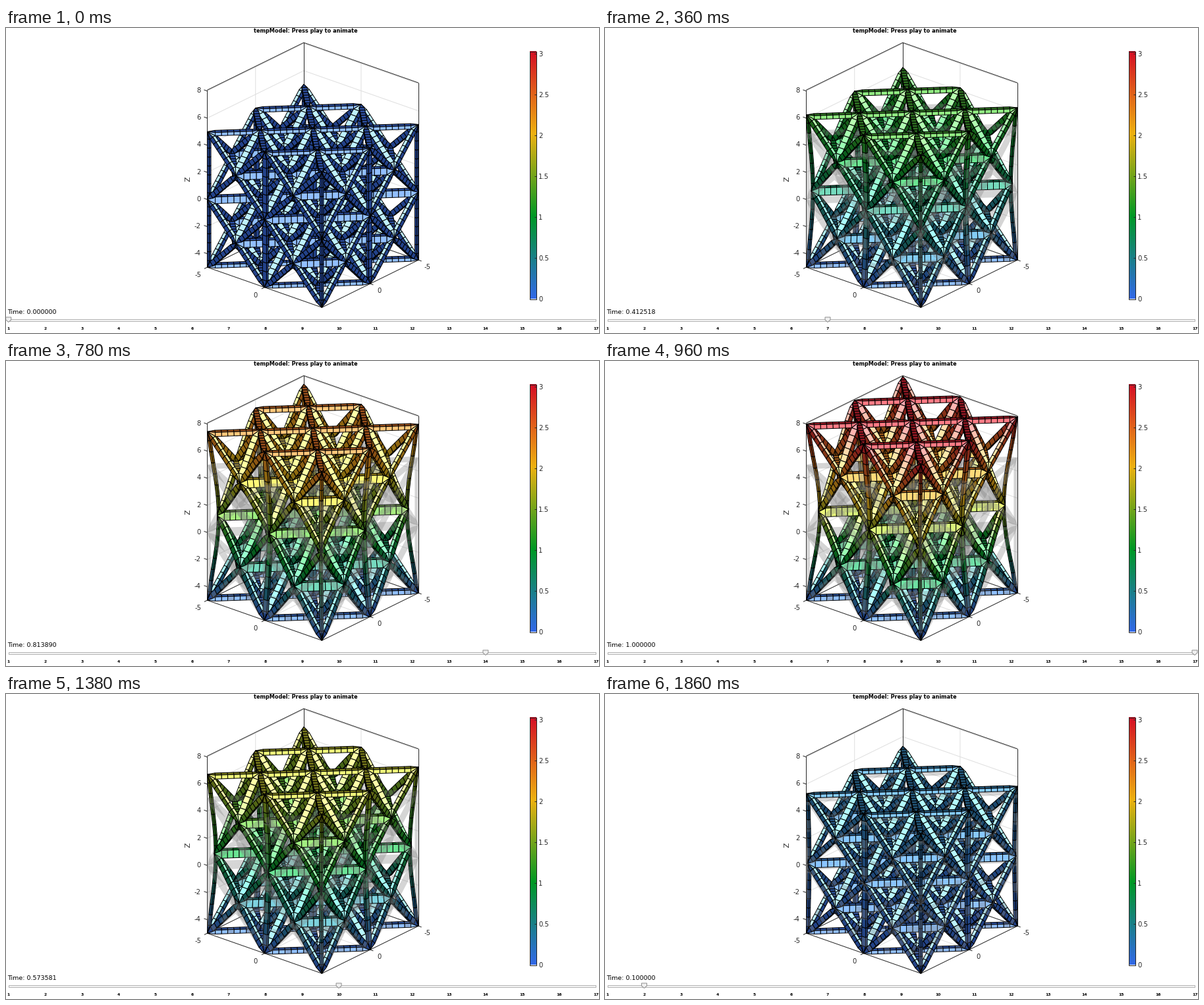
Recreate the animation shown at these times as a matplotlib script. Size 900 by 463 pixels, loop 1.92 s.

```python
import itertools
import numpy as np
import matplotlib.pyplot as plt
from matplotlib.animation import FuncAnimation
from matplotlib.collections import PolyCollection
from matplotlib.colors import LinearSegmentedColormap

W, H, DPI = 900, 463, 100
STEPS, FRAMES, INTERVAL = 17, 32, 60
PX = 72 / DPI
ZMAX = 8.07
CMAX = 3.03
INSET = 0.3  # distance from a strut axis to the rim of its triangular windows

# Orthographic view: screen = ORIGIN + points @ PROJ, y pointing down
ORIGIN = np.array([465.7, 254.8])
PROJ = np.array([[-14.65, 7.2], [17.4, 6.1], [0, -20.58]])
VIEW = np.cross(PROJ[:, 0], -PROJ[:, 1])
VIEW = VIEW / np.linalg.norm(VIEW)
LIGHT = np.array([0.56, 0.56, 0.61])

STOPS = np.array([[51, 105, 232], [0, 153, 37], [238, 178, 17], [213, 15, 37]]) / 255
CMAP = LinearSegmentedColormap.from_list("spectrum", STOPS)


def project(p):
    return ORIGIN + np.asarray(p, float) @ PROJ


def octet_struts():
    """Node pairs of a 2x2x2 octet truss with extra vertical members."""
    grid = range(-2, 3)
    nodes = [n for n in itertools.product(grid, repeat=3) if sum(n) % 2 == 0]
    steps = [(1, 1, 0), (1, -1, 0), (1, 0, 1), (1, 0, -1), (0, 1, 1), (0, 1, -1)]
    pairs = []
    for n in nodes:
        for s in steps:
            m = tuple(np.add(n, s))
            if max(map(abs, m)) <= 2:
                pairs.append((n, m))
    for x, y, z in itertools.product((-2, 0, 2), (-2, 0, 2), (-2, 0)):
        pairs.append(((x, y, z), (x, y, z + 2)))
    return 2.5 * np.array(pairs, float)


def build_mesh(segments):
    """Quads (n, 4, 3) and normals (n, 3) of struts that taper to their nodes."""
    quads, normals = [], []
    for a, b in octet_struts():
        length = np.linalg.norm(b - a)
        d = (b - a) / length
        u = np.eye(3)[np.argmin(np.abs(d))]
        w = np.cross(d, u)
        thin = INSET / np.sqrt(3)
        tall = thin if abs(d[2]) > 0.9 else thin * np.sqrt(2)
        ring = np.array([tall * i * u + thin * j * w
                         for i, j in ((1, 1), (-1, 1), (-1, -1), (1, -1))])
        tip = INSET * np.sqrt(3) / length
        s = np.r_[0, np.linspace(tip, 1 - tip, segments + 1), 1][:, None, None]
        taper = np.minimum(1, np.minimum(s, 1 - s) / tip)
        pts = np.clip(a + s * (b - a) + taper * ring, -5, 5)
        for k, normal in enumerate((w, -u, -w, u)):
            m = (k + 1) % 4
            quads.append(np.stack([pts[:-1, k], pts[:-1, m],
                                   pts[1:, m], pts[1:, k]], axis=1))
            normals.append(np.tile(normal, (segments + 2, 1)))
    return np.concatenate(quads), np.concatenate(normals)


def displacement(p, t):
    """Stretch along z with necking between the clamped ends."""
    neck = 0.115 * t * np.maximum(np.cos(np.pi * p[..., 2] / 10), 0) ** 1.5
    return np.stack([-p[..., 0] * neck, -p[..., 1] * neck,
                     0.3 * t * (p[..., 2] + 5)], axis=-1)


def front_facing(scr):
    x, y = scr[..., 0], scr[..., 1]
    area = np.sum(x * np.roll(y, -1, 1) - y * np.roll(x, -1, 1), axis=1) / 2
    return area < -0.3


QUADS, NORMALS = build_mesh(6)
lit = np.maximum(NORMALS @ LIGHT, 0)[:, None]
DIFFUSE = 0.42 + 0.85 * lit ** 3
GLOSS = 2.6 * lit ** 8

ghost_quads, _ = build_mesh(2)
ghost_scr = project(ghost_quads)
seen = front_facing(ghost_scr)
GHOST = ghost_scr[seen]
GHOST_DEPTH = ghost_quads[seen].mean(axis=1) @ VIEW
GHOST_RGBA = np.tile([0.5, 0.5, 0.5, 0.33], (len(GHOST), 1))


def scene(t):
    """Depth-sorted polygons with face and edge colours at load t."""
    u = displacement(QUADS, t)
    pts = QUADS + u
    scr = project(pts)
    keep = front_facing(scr)
    value = np.linalg.norm(u[keep].mean(axis=1), axis=1)
    rgb = CMAP(value / CMAX)[:, :3] * DIFFUSE[keep] + GLOSS[keep]
    face = np.column_stack([np.clip(rgb, 0, 1), np.ones(len(rgb))])
    edge = np.tile([0, 0, 0, 1.0], (len(rgb), 1))
    polys, depth = scr[keep], pts[keep].mean(axis=1) @ VIEW
    if t > 0:
        polys = np.concatenate([polys, GHOST])
        depth = np.concatenate([depth, GHOST_DEPTH])
        face = np.concatenate([face, GHOST_RGBA])
        edge = np.concatenate([edge, np.zeros_like(GHOST_RGBA)])
    order = np.argsort(depth)
    return polys[order], face[order], edge[order]


def load_time(i):
    return float(np.interp(i, [1, 2, 5, 7, 10, 14, 17],
                           [0, 0.1, 0.337259, 0.412518, 0.573581, 0.81389, 1]))


fig = plt.figure(figsize=(W / DPI, H / DPI), dpi=DPI, facecolor="white")
ax = fig.add_axes([0, 0, 1, 1])
ax.axis("off")


def line(pts, color="#262626", width=1, z=1):
    x, y = np.transpose(pts)
    ax.plot(x, y, color=color, lw=width * PX, zorder=z, solid_capstyle="butt")


def label(x, y, s, size=10, color="#262626", ha="center", va="center", **kw):
    return ax.text(x, y, s, fontsize=size * PX, color=color, ha=ha, va=va,
                   family="DejaVu Sans", **kw)


def line3(*pts, **kw):
    line(project(pts), **kw)


def draw_box():
    for z in range(-4, 9, 2):
        line3((5, -5, z), (-5, -5, z), (-5, 5, z), color="#dfdfdf", z=0)
    line3((0, 5, -5), (0, -5, -5), (0, -5, ZMAX), color="#dfdfdf", z=0)
    line3((5, 0, -5), (-5, 0, -5), (-5, 0, ZMAX), color="#dfdfdf", z=0)
    corners = [(5, -5), (-5, -5), (-5, 5)]
    line3(*[(x, y, ZMAX) for x, y in corners])
    line3(*[(x, y, -5) for x, y in corners + [(5, 5), (5, -5)]])
    for x, y in corners:
        line3((x, y, -5), (x, y, ZMAX))


def draw_ticks():
    for z in range(-4, 9, 2):
        p = project((5, -5, z))
        line([p, p + (-5, -1.8)])
        label(295.5, p[1] - 1.5, str(z), ha="right", va="center_baseline")
    for v in (-5, 0):
        p = project((5, v, -5))
        line([p, p + (-4.5, 2.2)])
        label(p[0] - 14, p[1] + 12, str(v))
        p = project((v, 5, -5))
        line([p, p + (4.7, 1.7)])
        label(p[0] + 14, p[1] + 11, str(v))
    label(277, 229, "Z", size=11, rotation=90)


def draw_colorbar():
    x0, x1, y0, y1 = 794.5, 804.5, 35.5, 411.5
    ramp = CMAP(np.linspace(1, 0, 256))[:, None, :3]
    ax.imshow(ramp, extent=(x0, x1, y1, y0), aspect="auto", zorder=1)
    line([(x0, y0), (x1, y0), (x1, y1), (x0, y1), (x0, y0)], z=2)
    for k in range(7):
        y = y1 - k * 0.5 * (y1 - y0) / CMAX
        line([(x1 - 3, y), (x1, y)], z=2)
        label(808, y + 0.7, f"{k / 2:g}", ha="left")


def slider_x(i):
    return 3.8 + 55.7 * (i - 1)


def draw_slider():
    ax.add_patch(plt.Rectangle((3.5, 441.5), 891, 3, fc="#f4f4f4",
                               ec="#b4b4b4", lw=PX, zorder=1))
    for i in range(1, STEPS + 1):
        label(slider_x(i), 457, str(i), size=6, color="black", weight="bold")


draw_box()
draw_ticks()
draw_colorbar()
draw_slider()
label(455, 4.5, "tempModel: Press play to animate", size=8.1,
      color="black", weight="bold")
clock = label(2.5, 434, "", size=9.5, color="black", ha="left", va="baseline")
thumb = plt.Polygon([(0, 0)] * 5, fc="#f0f0f0", ec="#909090", lw=PX, zorder=3)
ax.add_patch(thumb)
mesh = PolyCollection([], linewidths=PX, zorder=2, joinstyle="bevel")
ax.add_collection(mesh, autolim=False)
ax.set_xlim(0, W)
ax.set_ylim(H, 0)
ax.set_aspect("auto")

THUMB = np.array([(-4, 439), (4, 439), (4, 443), (0, 446.5), (-4, 443)])


def update(f):
    i = 1 + min(f, FRAMES - f)
    t = load_time(i)
    polys, face, edge = scene(t)
    mesh.set_verts(polys)
    mesh.set_facecolor(face)
    mesh.set_edgecolor(edge)
    thumb.set_xy(THUMB + (slider_x(i), 0))
    clock.set_text(f"Time: {t:.6f}")
    return mesh, thumb, clock


anim = FuncAnimation(fig, update, frames=FRAMES, interval=INTERVAL,
                     repeat=True, repeat_delay=0)
plt.show()
```
